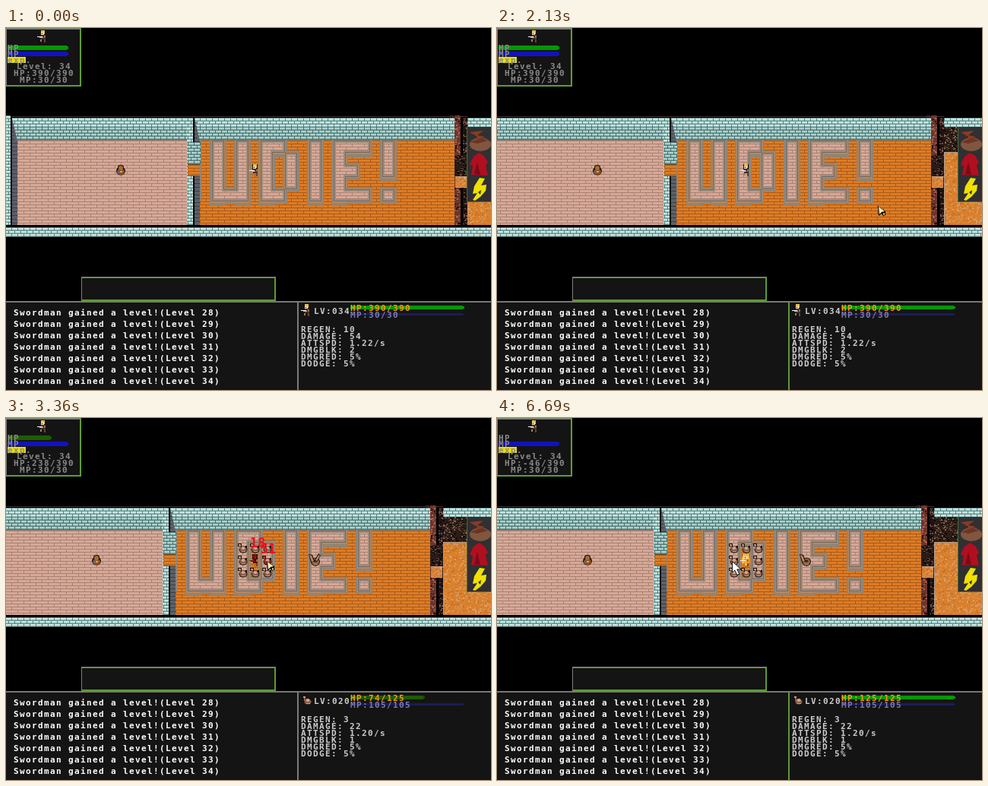
Animation of 638x476 px, one loop 6720 ms. Source, as an HTML page with a canvas:

```html
<!DOCTYPE html>
<html lang="en">
<head>
<meta charset="utf-8">
<title>Dungeon fight</title>
<style>
  html, body { margin: 0; width: 638px; height: 476px; overflow: hidden; background: #000; }
  canvas { position: absolute; left: 0; top: 0; }
  p {
    position: absolute; margin: 0; white-space: pre; color: #ccc;
    font: bold 11px/10px "DejaVu Sans Mono", monospace; letter-spacing: 1.38px;
  }
  .grey { color: #898989; }
  .log { color: #fff; line-height: 15px; }
  .stats { line-height: 9px; }
</style>
</head>
<body>
<canvas id="stage" width="638" height="476"></canvas>
<p class="grey" style="left:2px;top:22px">HP</p>
<p class="grey" style="left:2px;top:30px">MP</p>
<p class="grey" style="left:2px;top:38px">exp.</p>
<p class="grey" style="left:14px;top:46px">Level: 34</p>
<p class="grey" id="heroHp" style="left:10px;top:55px"></p>
<p class="grey" style="left:18px;top:64px">MP:30/30</p>
<p class="log" id="log" style="left:10px;top:367px"></p>
<p id="level" style="left:405px;top:368px"></p>
<p id="hp" style="left:453px;top:364px;color:#ff9a10"></p>
<p id="mp" style="left:453px;top:373px;color:#7c7cb4"></p>
<p class="stats" id="stats" style="left:388px;top:392px"></p>
<script>
const LOOP = 6720, STEP = 30;
const SPAWN = 2400, HOVER = 3090, REHOVER = 3780, POSE = 5910, GLOW = 6060, ARROW = 6630;
const HITS = [3270, 4140, 4980];
const HERO_HP = [390, 238, 96, -46];
const HERO = { level: '034', mp: '30/30', stats: [10, 54, '1.22/s', 2] };
const SNAKE = { level: '020', mp: '105/105', stats: [3, 22, '1.20/s', 1] };

// [time, value...] points, joined by straight lines
const CAMERA = [[1800, 0], [1830, -2], [2130, -19], [2550, -46], [2580, -48], [2700, -48], [2970, -32]];
const CURSOR = [[1710, 415, 212], [1830, 440, 226], [2130, 502, 235], [2550, 429, 218],
  [3090, 352, 193], [3360, 344, 189], [4590, 330, 203], [5820, 309, 188]];

const el = id => document.getElementById(id);
const stage = el('stage').getContext('2d');
let g;

function at(points, t) {
  const i = points.findIndex(p => p[0] > t);
  if (i < 0) return points[points.length - 1].slice(1);
  if (i === 0) return points[0].slice(1);
  const a = points[i - 1], b = points[i], k = (t - a[0]) / (b[0] - a[0]);
  return a.slice(1).map((v, j) => v + (b[j + 1] - v) * k);
}

function box(color, x, y, w, h) {
  g.fillStyle = color;
  g.fillRect(x, y, w, h);
}

function poly(color, ...xy) {
  g.beginPath();
  for (let i = 0; i < xy.length; i += 2) g.lineTo(xy[i], xy[i + 1]);
  g.closePath();
  g.fillStyle = color;
  g.fill();
}

function oval(color, x, y, rx, ry) {
  g.beginPath();
  g.ellipse(x, y, rx, ry, 0, 0, 7);
  g.fillStyle = color;
  g.fill();
}

function bricks(x, y, w, h, bw, bh, fill, line, light) {
  g.save();
  g.beginPath();
  g.rect(x, y, w, h);
  g.clip();
  box(fill, x, y, w, h);
  for (let r = 0; r * bh < h; r++) {
    const top = y + r * bh;
    if (light) box(light, x, top + 1, w, 1);
    box(line, x, top, w, 1);
    const first = Math.floor(x / bw) * bw + (r % 2 ? bw / 2 : 0) - 1;
    for (let c = first; c < x + w; c += bw) box(line, c, top, 1, bh);
  }
  g.restore();
}

const cap = (x, y, w, h) => bricks(x, y, w, h, 8, 4, '#a4d2ce', '#587f7c', '#effffc');
const face = (x, y, w, h) => bricks(x, y, w, h, 8, 4, '#8cbcb8', '#486c6a', '#cce9e6');
const pink = (x, y, w, h) => bricks(x, y, w, h, 16, 4, '#d6a898', '#a98272');
const orange = (x, y, w, h) => bricks(x, y, w, h, 16, 4, '#dc7c26', '#a85a1a');

function speckle(x, y, w, h, base, dots, seed) {
  box(base, x, y, w, h);
  const next = n => (seed = seed * 16807 % 2147483647) % n;
  for (let i = 0; i < w * h / 9; i++) {
    box(dots[i % dots.length], x + next(w - 1), y + next(h - 1), 2, 1 + i % 2);
  }
}

// column, row, width, height of the letter strokes in 16 px tiles
const LETTERS = [[0, 0, 1, 5], [2, 0, 1, 5], [0, 4, 3, 1],
  [4, 0, 1, 5], [4, 0, 2, 1], [6, 1, 1, 3], [5, 1, 2, 0], [4, 4, 2, 1],
  [8, 0, 1, 5],
  [10, 0, 1, 5], [10, 0, 3, 1], [10, 2, 2, 1], [10, 4, 3, 1],
  [14, 0, 1, 3], [14, 4, 1, 1]].filter(s => s[3]);

function drawLetters() {
  const layer = (color, grow) => LETTERS.forEach(([c, r, w, h]) =>
    box(color, 271 + 16 * c - grow, Math.max(148, 148 + 16 * r - grow),
      16 * w + 2 * grow, 16 * h + 2 * grow));
  layer('#8f8476', 3);
  layer('#b8875c', 1);
  layer('#74685e', 0);
  layer('#9b8c80', -1);
  g.save();
  g.beginPath();
  for (const [c, r, w, h] of LETTERS) g.rect(274 + 16 * c, 151 + 16 * r, 16 * w - 6, 16 * h - 6);
  g.clip();
  pink(271, 148, 242, 80);
  g.restore();
}

function drawWorld() {
  box('#3c3434', 0, 116, 607, 1);
  cap(8, 118, 582, 12);
  face(8, 130, 582, 18);
  pink(15, 148, 224, 111);
  orange(255, 148, 335, 111);
  box('#8d8070', 15, 147, 224, 1);
  box('#8d8070', 255, 147, 335, 1);
  drawLetters();
  box('#8f8476', 255, 148, 2, 80);

  // left wall
  cap(0, 115, 6, 147);
  box('#000', 6, 115, 2, 147);
  poly('#5d5d68', 8, 119, 15, 148, 15, 259, 8, 259);
  for (let y = 126; y < 259; y += 5) box('#3d3d48', 8, y, y < 148 ? 3 : 7, 1);

  // wall and passage between the rooms
  cap(238, 118, 8, 141);
  box('#000', 246, 118, 2, 141);
  poly('#5c6068', 248, 118, 255, 148, 255, 259, 248, 259);
  for (let y = 124; y < 259; y += 5) box('#3a3d45', 248, y, y < 148 ? 3 : 7, 1);
  face(239, 150, 17, 29);
  orange(239, 180, 16, 15);
  box('#7a4a1c', 239, 179, 16, 1);
  box('#7a4a1c', 239, 194, 16, 1);

  // rough wall on the right
  const rock = ['#9a5044', '#24120f', '#b06a58'];
  speckle(584, 115, 5, 3, '#4b2a24', rock, 3);
  speckle(590, 115, 8, 144, '#6a352c', rock, 5);
  speckle(601, 118, 6, 141, '#201414', ['#6a443c', '#0a0808', '#80584c'], 9);
  box('#000', 598, 118, 3, 141);
  speckle(590, 168, 17, 27, '#2a1b18', ['#76503f', '#0a0808'], 11);
  speckle(591, 195, 15, 15, '#d8843c', ['#e8a468', '#c87428'], 13);
  for (const y of [195, 209]) box('#c9a080', 591, y, 15, 1);
  cap(607, 118, 100, 12);
  speckle(607, 130, 100, 34, '#2a1c17', ['#8a6450', '#0c0706', '#5e4434'], 17);
  speckle(607, 164, 100, 95, '#d8802e', ['#e09448', '#c87020', '#d8a070'], 23);
  box('#b0a090', 607, 163, 100, 1);
  box('#b0a090', 607, 163, 1, 96);

  box('#000', 0, 259, 707, 3);
  cap(0, 262, 707, 12);
  box('#35504e', 0, 274, 707, 1);
}

function hero(x, y, hurt, glow) {
  if (glow) {
    oval('#e07c14', x, y, 7, 8);
    oval('#ffc83a', x, y, 5, 7);
  }
  const skin = hurt ? '#a01818' : '#f4d8b0', hair = hurt ? '#781010' : '#e6c04c';
  const cloth = glow ? '#f0a030' : hurt ? '#4c0c0c' : '#3a3036';
  box(glow ? '#ffe27a' : '#1a1010', x - 3, y - 8, 7, 7);
  box(hair, x - 2, y - 8, 5, 5);
  box(skin, x - 2, y - 5, 4, 3);
  box('#000', x - 1, y - 4, 1, 1);
  box(cloth, x - 2, y - 2, 6, 6);
  box('#9b6a3c', x + 2, y - 1, 2, 3);
  box('#a87850', x - 3, y + 4, 2, 3);
  box('#704428', x + 2, y + 4, 2, 4);
  box(hurt ? '#801414' : '#f2f2f2', x - 7, y, 7, 1);
  box(hurt ? '#601010' : '#b4b4c0', x - 4, y + 1, 5, 1);
}

function snake(x, y, hurt) {
  const body = hurt ? '#a8241e' : '#8a6048', light = hurt ? '#d03028' : '#c49a80';
  oval('#1c100c', x + 1, y + 2, 5.5, 4.5);
  oval(body, x + 1, y + 2, 4.5, 3.5);
  oval('#d0a595', x + 1, y, 2.5, 2);
  box(light, x - 1, y + 4, 5, 1);
  box('#1c100c', x - 6, y - 6, 5, 4);
  box(light, x - 5, y - 5, 3, 2);
  box(body, x - 4, y - 3, 2, 4);
  box('#1c100c', x + 4, y - 3, 2, 3);
}

function bigSnake(x, y, horns) {
  oval('#1a100c', x + 1, y + 2, 6, 5.5);
  oval('#8e6444', x + 1, y + 2, 5, 4.5);
  oval('#3a2418', x + 1, y + 1, 2.5, 1.5);
  box('#c09070', x - 1, y + 5, 5, 1);
  poly('#1a100c', x - 8, y - 8, x - 3, y - 7, x, y + 1, x - 5, y + 3);
  poly('#b88860', x - 7, y - 7, x - 4, y - 6, x - 1, y + 1, x - 4, y + 2);
  if (!horns) return;
  poly('#1a100c', x + 5, y - 9, x + 8, y - 6, x + 3, y + 2, x, y);
  poly('#b88860', x + 5, y - 7, x + 7, y - 6, x + 3, y + 1, x + 1, y);
}

function critter(x, y) {
  oval('#1c100a', x, y + 1, 6, 5.5);
  oval('#8a5226', x, y + 2, 5, 4);
  oval('#1c100a', x, y - 4, 4, 3);
  oval('#a86a34', x, y - 3, 3, 3);
  box('#4a78a0', x - 4, y + 2, 2, 2);
  box('#e0a050', x - 1, y + 1, 3, 2);
}

function panel(x, y, w, h) {
  box('#7c7c7c', x, y, w, h);
  box('#5f9c30', x + 1, y + 1, w - 1, h - 1);
  box('#141414', x + 1, y + 2, w - 3, h - 4);
}

function icons() {
  box('#302f31', 606, 130, 32, 99);
  box('#456c35', 606, 130, 1, 99);
  box('#456c35', 606, 228, 32, 1);
  oval('#80563f', 624, 153, 14, 9);
  poly('#6c3424', 611, 150, 624, 144, 634, 148, 620, 152);
  poly('#8a3c24', 610, 137, 628, 135, 620, 141, 630, 143, 617, 148, 620, 143);
  poly('#b00f20', 622, 164, 629, 168, 634, 177, 631, 180, 634, 194, 612, 193, 614, 182, 610, 179, 615, 169);
  poly('#7c0a18', 620, 176, 624, 193, 616, 192);
  poly('#efe100', 623, 197, 630, 198, 625, 207, 632, 206, 631, 214, 624, 222, 617, 227, 614, 226, 620, 217, 614, 218, 616, 208);
  poly('#302f31', 625, 213, 624, 219, 621, 216);
}

const hpColor = f => `rgb(${75 * (1 - f)},${152 * f},0)`;

function bar(color, x, y, w, h, max) {
  const len = Math.min(w, max);
  if (len <= 0) return;
  box(color, x, y, len, h);
  box(color, x + len, y + 1, 2, h - 2);
}

function damage(text, x, y, size) {
  g.font = `bold ${size}px "DejaVu Sans Mono", monospace`;
  g.textAlign = 'center';
  g.textBaseline = 'middle';
  g.fillStyle = '#f01018';
  g.fillText(text, x, y);
}

function drawDamage(t) {
  for (const hit of HITS) {
    const k = (t - hit - 90) / 400;
    if (t < hit || k > 1.8) continue;
    const size = Math.max(4, 17 - 7 * k);
    damage('18', 331 + 13 * k, 166 - 15 * k, size);
    damage('51', 345 + 17 * k, 174 - 7 * k, size);
  }
}

function arrow(x, y, fill, edge) {
  const shape = [0, 0, 0, 14, 3, 11, 6, 17, 9, 16, 6, 10, 11, 10];
  poly(fill, ...shape.map((v, i) => v * 1.05 + (i % 2 ? y : x)));
  g.strokeStyle = edge;
  g.lineWidth = 1;
  g.stroke();
}

function drawCursor(t) {
  if (t < CURSOR[0][0]) return;
  const [x, y] = at(CURSOR, t).map(Math.round);
  if (t >= ARROW) return arrow(x + .5, y + .5, '#fff', '#111');
  poly('#000', x - 1, y - 1, x + 9, y + 6, x + 9, y + 11, x + 6, y + 12, x + 4, y + 9, x, y + 12);
  poly('#f4efb8', x, y, x + 8, y + 6, x + 4, y + 7, x + 1, y + 10);
  box('#c8b860', x + 6, y + 8, 2, 3);
}

const world = document.createElement('canvas');
world.width = 707;
world.height = 476;
g = world.getContext('2d');
drawWorld();

el('log').textContent = Array.from({ length: 7 }, (_, i) => `Swordman gained a level!(Level ${28 + i})`).join('\n');

function setText(id, text) {
  if (el(id).textContent !== text) el(id).textContent = text;
}

function draw(t) {
  g = stage;
  const cam = Math.round(at(CAMERA, t)[0]);
  const hurt = HITS.some(h => t >= h && t < h + 150);
  const onSnake = t >= HOVER;
  const life = HERO_HP[HITS.filter(h => t >= h).length];
  const who = onSnake ? SNAKE : HERO;
  const hp = !onSnake ? 390 : t >= HITS[0] && t < REHOVER ? 74 : 125;
  const full = onSnake ? 125 : 390;

  box('#000', 0, 0, 638, 476);
  g.drawImage(world, cam, 0);
  critter(151 + cam, 187);
  if (t >= SPAWN) {
    bigSnake(438 + cam, 187, t < POSE);
    for (let i = 0; i < 9; i++) {
      const col = i % 3 - 1, row = Math.floor(i / 3) - 1;
      if (i !== 4) snake(359 + cam + 16 * col, 187 + 16 * row, hurt && i === 5);
    }
  }
  hero(327, 187, hurt, t >= GLOW);
  drawDamage(t);
  icons();

  panel(0, 0, 99, 77);
  hero(48, 11);
  const f = life / 390;
  if (f > 0) bar(hpColor(f), 2, 23, 7 + 80 * f, 6, 78);
  bar('#1212c0', 2, 31, 78, 6, 78);
  box('#e8dc10', 2, 38, 24, 8);

  panel(99, 327, 256, 32);
  box('#141414', 0, 360, 638, 116);
  box('#777', 0, 359, 638, 2);
  box('#5f9c30', 383, 360, 1, 116);
  box('#777', 384, 360, 1, 116);
  if (onSnake) snake(396, 371);
  else hero(395, 371);
  const k = hp / full;
  bar(hpColor(k), 453, 365, 7 + 150 * k, 5, 148);
  bar('#1c1c58', 453, 375, 148, 3, 148);

  setText('heroHp', `HP:${life}/390`);
  setText('level', 'LV:' + who.level);
  setText('hp', `HP:${hp}/${full}`);
  setText('mp', 'MP:' + who.mp);
  const [regen, dmg, speed, block] = who.stats;
  setText('stats', `REGEN: ${regen}\nDAMAGE: ${dmg}\nATTSPD: ${speed}\nDMGBLK: ${block}\nDMGRED: 5%\nDODGE: 5%`);
  drawCursor(t);
}

const start = performance.now();
function frame() {
  const t = (performance.now() - start) % LOOP;
  draw(Math.floor(t / STEP) * STEP);
  requestAnimationFrame(frame);
}
frame();
</script>
</body>
</html>
```
